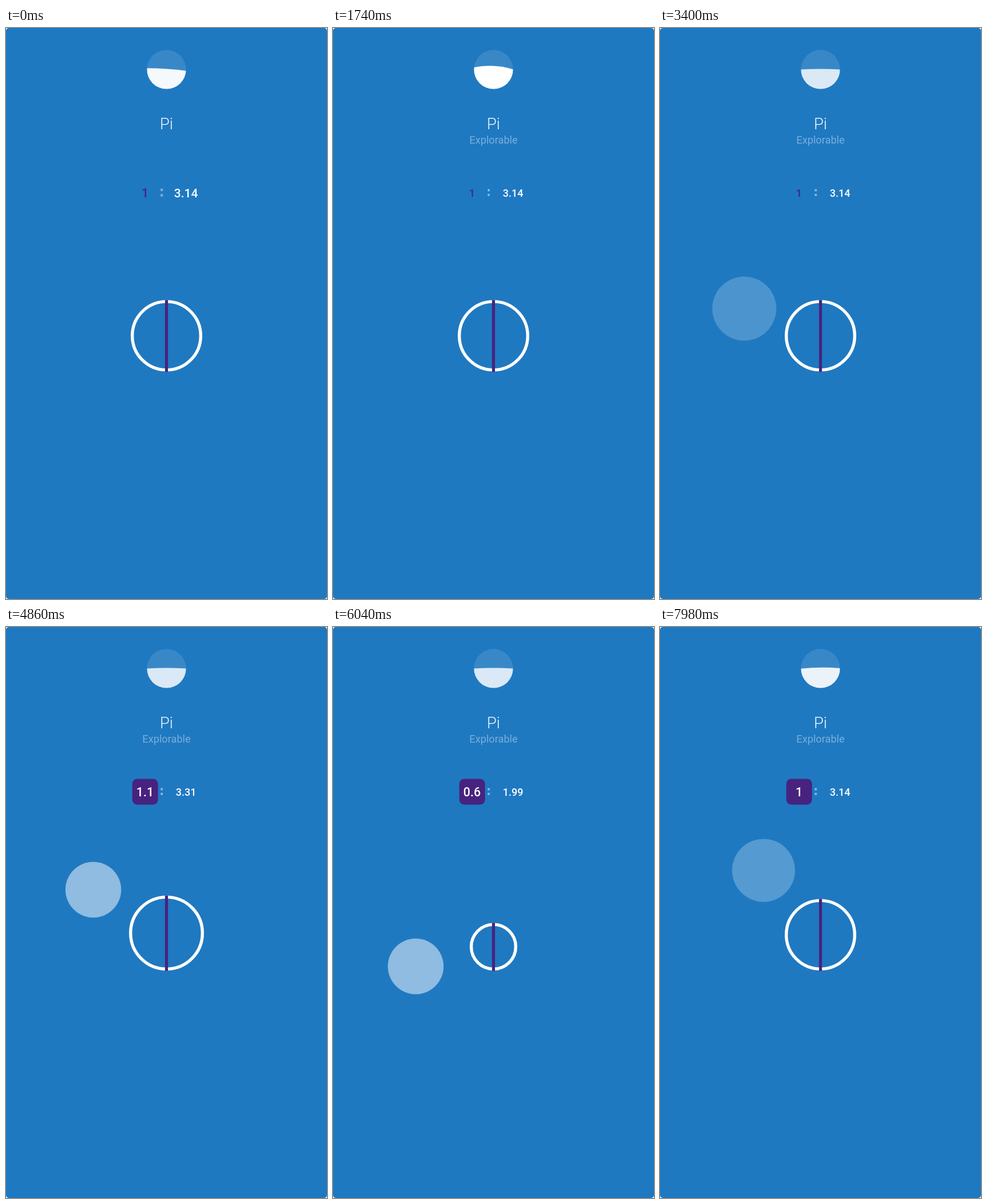
An HTML page with a canvas that plays this animation: 561 px wide and 998 px high, repeating every 8 s.

```html
<!DOCTYPE html>
<html lang="en">
<head>
<meta charset="utf-8">
<title>Pi</title>
<style>
html, body { margin: 0; width: 100%; height: 100%; overflow: hidden; background: #fff; }
canvas { display: block; }
</style>
</head>
<body>
<canvas id="stage" width="561" height="998"></canvas>
<script>
const ctx = document.getElementById('stage').getContext('2d');
const LOOP = 8000, CX = 280.5, BLUE = '#1f79c1', PURPLE = '#47237f';

// The finger presses, drags up, then down, then settles.
const press = { x: 147.3, y: 490.4, t: 4722 };
const top_ = { x: 180, y: 297, t: 5250 };
const low = { x: 143, y: 606, t: 6160 };
const rest = { x: 181, y: 425.4, t: 7221 };

const white = alpha => `rgba(255,255,255,${alpha})`;
const mix = (a, b, u) => a + (b - a) * u;
const short = (n, digits) => String(+n.toFixed(digits));

function ease(t, from, to) {
  const u = Math.min(1, Math.max(0, (t - from) / (to - from)));
  return (1 - Math.cos(Math.PI * u)) / 2;
}

function swell(t, from, to) {
  return t > from && t < to ? Math.sin(Math.PI * (t - from) / (to - from)) : 0;
}

function finger(t) {
  const [a, b] = t < top_.t ? [press, top_] : t < low.t ? [top_, low] : [low, rest];
  const u = ease(t, a.t, b.t);
  return { x: mix(a.x, b.x, u), y: mix(a.y, b.y, u) };
}

// Diameter follows the finger a little late, up to a limit.
function diameter(t) {
  const origin = t < top_.t ? press.y : rest.y;
  return Math.min(1.14, 1 + (origin - finger(t - 20).y) / 445);
}

function disc(x, y, r, color) {
  ctx.fillStyle = color;
  ctx.beginPath();
  ctx.arc(x, y, r, 0, Math.PI * 2);
  ctx.fill();
}

function roundRect(x, y, w, h, r, color) {
  ctx.fillStyle = color;
  ctx.beginPath();
  ctx.roundRect(x, y, w, h, r);
  ctx.fill();
}

function label(text, x, baseline, weight, size, color) {
  ctx.font = `${weight} ${size}px Roboto, sans-serif`;
  ctx.textAlign = 'center';
  ctx.fillStyle = color;
  ctx.fillText(text, x, baseline);
}

function drawLiquid(t) {
  const energy = swell(t, -210, 3280) + 0.6 * swell(t, 6780, 8060);
  const phase = 0.137 + 2 * Math.PI * (t - 1740) / 628;
  const tilt = 12 * energy * Math.sin(phase);
  const heave = energy * Math.cos(phase);
  const level = 72.6 - 2.1 * heave;
  const bulge = -1.1 - 3.4 * heave;
  const r = 34.2, y = 72.5;

  disc(CX, y, r, white(0.11));
  ctx.save();
  ctx.beginPath();
  ctx.arc(CX, y, r, 0, Math.PI * 2);
  ctx.clip();
  ctx.fillStyle = white(0.81 + 0.19 * Math.min(1, 4 * energy));
  ctx.beginPath();
  ctx.moveTo(CX - r, level - tilt);
  ctx.quadraticCurveTo(CX, level + 2 * bulge, CX + r, level + tilt);
  ctx.lineTo(CX + r, y + r);
  ctx.lineTo(CX - r, y + r);
  ctx.fill();
  ctx.restore();
}

function drawNumbers(t, value, intro) {
  const on = ease(t, 4320, 4500);
  const scale = mix(1.17, 1, intro);
  const middle = 288;

  if (on > 0) {
    const side = 45 * mix(0.7, 1, on);
    ctx.globalAlpha = on;
    roundRect(243.2 - side / 2, middle - side / 2, side, side, 8.5, PURPLE);
    ctx.globalAlpha = 1;
  }
  const leftSize = 18.3 * mix(scale, 1.17, on);
  const ink = `rgb(${mix(71, 255, on)},${mix(35, 255, on)},${mix(127, 255, on)})`;
  label(short(value, 1), 243, middle + leftSize * 0.37, 500, leftSize, ink);

  const dot = 3.6 * scale, gap = 4.1 * scale;
  ctx.fillStyle = white(mix(0.4, 0.5, intro));
  for (const side of [-1, 1])
    ctx.fillRect(272.2 - dot / 2, middle - 0.4 + side * gap - dot / 2, dot, dot);

  const rightSize = 18 * scale;
  label(short(value * Math.PI, 2), 314.6, middle + rightSize * 0.37, 500, rightSize, '#fff');
}

function drawRing(value) {
  const r = 62.5 + 57 * (value - 1), bottom = 600.4, stroke = 5.4;
  ctx.strokeStyle = '#fff';
  ctx.lineWidth = stroke;
  ctx.beginPath();
  ctx.arc(CX, bottom - r, r - stroke / 2, 0, Math.PI * 2);
  ctx.stroke();
  ctx.fillStyle = PURPLE;
  ctx.fillRect(CX - 2.6, bottom - 2 * r, 5.2, 2 * r + 0.6);
}

function drawFinger(t) {
  const { x, y } = finger(t);
  const grip = ease(t, 4320, 4480) - ease(t, 7860, 8020);
  const alpha = 0.2 * ease(t, 3180, 3280) + 0.3 * grip;
  disc(x, y, mix(56, 48.7, grip), white(alpha));
}

function draw(t) {
  const intro = ease(t, 0, 360), value = diameter(t);
  ctx.clearRect(0, 0, 561, 998);
  roundRect(0, 0, 561, 998, 5, BLUE);
  drawLiquid(t);
  label('Pi', CX, 177, 300, 27.3, white(0.95));
  label('Explorable', CX, 202.2, 400, 18.2, white(0.4 * intro));
  drawNumbers(t, value, intro);
  drawRing(value);
  drawFinger(t);
}

const start = performance.now();
function tick() {
  draw((performance.now() - start) % LOOP);
  requestAnimationFrame(tick);
}
tick();
</script>
</body>
</html>
```
